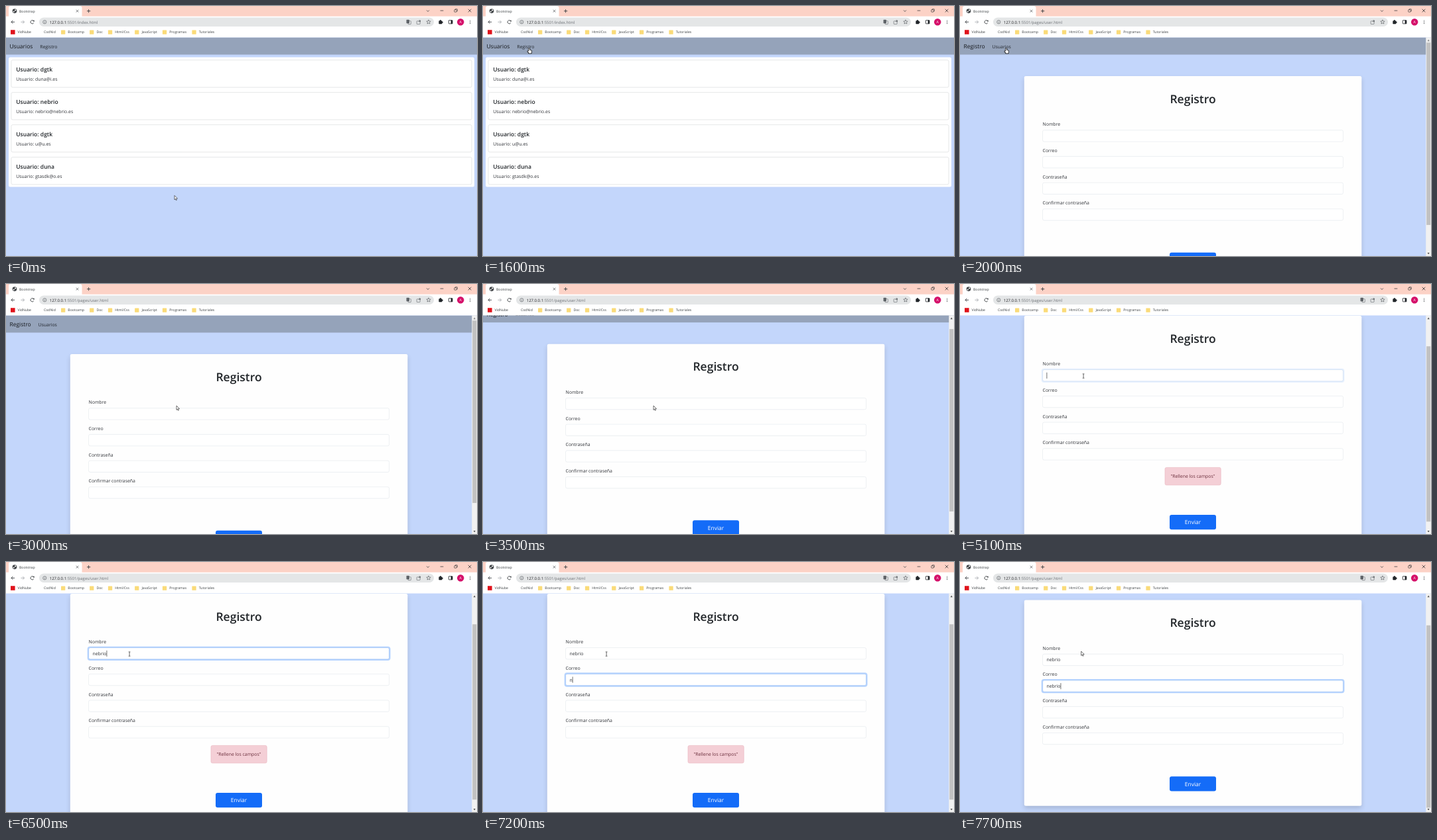
These frames come from a looping animation (710x378 px, 8 s). An HTML page with a canvas:

```html
<!DOCTYPE html>
<html lang="es">
<head>
<meta charset="utf-8">
<title>Bootstrap</title>
<style>
html, body { margin: 0; width: 100%; height: 100%; overflow: hidden; background: #c3d6fb; }
canvas { display: block; width: 710px; height: 378px; }
</style>
</head>
<body>
<canvas id="stage"></canvas>
<script>
const W = 710, H = 378, LOOP = 8000;
const TOP = 47.5;          // where the page begins
const NAV = 26;            // navbar height
const SCROLL_MAX = 48.5;
const FIELD_H = 17.4, FIELD_GAP = 39.7;
const BODY = 6.9, BRAND = 8.5, TITLE = 17.5, SMALL = 5.15;
const FONT = '"Open Sans", "Noto Sans", sans-serif';
const INK = '#212529', SOFT = '#303338', ICON = '#3c4043', GREY = '#5f6368';
const USER = 'nebrio';

const canvas = document.getElementById('stage');
const dpr = window.devicePixelRatio || 1;
canvas.width = W * dpr;
canvas.height = H * dpr;
const c = canvas.getContext('2d');

const span = (t, a, b) => Math.max(0, Math.min(1, (t - a) / (b - a)));
const smooth = u => u * u * (3 - 2 * u);
const mix = (a, b, u) => a + (b - a) * u;

/* ---- drawing helpers ---- */
function text(s, x, y, size, color = INK, weight = 400, align = 'left') {
  c.font = `${weight} ${size}px ${FONT}`;
  c.textRendering = 'geometricPrecision';
  c.textAlign = align;
  c.fillStyle = color;
  c.fillText(s, x, y);
  return c.measureText(s).width;
}

function paint(fill, stroke, lw) {
  if (fill) { c.fillStyle = fill; c.fill(); }
  if (stroke) { c.strokeStyle = stroke; c.lineWidth = lw; c.stroke(); }
}

function box(x, y, w, h, r, fill, stroke, lw = 0.6) {
  c.beginPath();
  c.roundRect(x, y, w, h, r);
  paint(fill, stroke, lw);
}

function disc(x, y, r, fill, stroke, lw = 0.7) {
  c.beginPath();
  c.arc(x, y, r, 0, 7);
  paint(fill, stroke, lw);
}

function poly(x, y, pts, fill, stroke, lw) {
  c.beginPath();
  for (let i = 0; i < pts.length; i += 2) c.lineTo(x + pts[i], y + pts[i + 1]);
  c.closePath();
  paint(fill, stroke, lw);
}

function line(x0, y0, x1, y1, color, lw = 0.7) {
  c.beginPath();
  c.moveTo(x0, y0);
  c.lineTo(x1, y1);
  paint(null, color, lw);
}

function cross(x, y, r, color = ICON) {
  line(x - r, y - r, x + r, y + r, color);
  line(x - r, y + r, x + r, y - r, color);
}

// A bent stroke whose tip points along the angle.
function chevron(x, y, r, angle, color, lw = 0.9) {
  for (const side of [-1, 1]) {
    const a = angle + Math.PI + side * Math.PI / 4;
    line(x, y, x + r * Math.cos(a), y + r * Math.sin(a), color, lw);
  }
}

function arrow(x, y, r, angle, color) {
  const dx = r * Math.cos(angle), dy = r * Math.sin(angle);
  line(x - dx, y - dy, x + dx, y + dy, color, 0.9);
  chevron(x + dx, y + dy, r * 1.3, angle, color);
}

// Star when inner and outer radius differ, triangle with three equal points.
function spikes(x, y, n, outer, inner, turn, fill, stroke) {
  const pts = [];
  for (let i = 0; i < n; i++) {
    const r = i % 2 ? inner : outer, a = turn + i * 2 * Math.PI / n;
    pts.push(r * Math.cos(a), r * Math.sin(a));
  }
  poly(x, y, pts, fill, stroke, 0.7);
}

const UP = -Math.PI / 2, DOWN = Math.PI / 2;
const triangle = (x, y, r, turn, color) => spikes(x, y, 3, r, r, turn, color);

/* ---- browser window ---- */
function tabStrip() {
  const y = 7.6;
  c.fillStyle = '#fcd2c6';
  c.fillRect(0, 0, W, 16);
  box(4, 0, 110.5, 18, 3, '#fff');
  disc(13, y, 3.3, ICON);
  disc(11.7, y + 0.9, 1.1, '#fff');
  disc(14.2, y - 1.2, 1.1, '#fff');
  text('Bootstrap', 20, y + 2, SMALL, ICON);
  cross(107.5, y, 1.8);
  line(122, y, 127.3, y, ICON, 0.9);
  line(124.6, y - 2.6, 124.6, y + 2.6, ICON, 0.9);
  chevron(636, y + 0.8, 2.8, DOWN, ICON, 0.8);
  line(654.6, 7, 659.4, 7, INK);
  box(677, 4.6, 3.4, 3.4, 0.5, null, INK);
  box(675.8, 5.7, 3.4, 3.4, 0.5, '#fcd2c6', INK);
  cross(699, 7, 2.3, INK);
}

function toolbar(path, translate) {
  const y = 24.2, pill = '#e4e6e7';
  c.fillStyle = '#fff';
  c.fillRect(0, 15.6, W, TOP - 15.6);
  arrow(10.5, y, 2.6, Math.PI, ICON);
  arrow(25, y, 2.6, 0, '#a9acb0');
  c.beginPath();
  c.arc(39.6, y, 2.6, 0.5, 5.6);
  paint(null, ICON, 0.9);
  triangle(41.8, y - 1.6, 1.6, Math.PI / 4, ICON);

  box(50, y - 6.7, 595, 13.4, 6.7, pill);
  disc(58.3, y, 2.6, null, GREY);
  line(58.3, y - 0.4, 58.3, y + 1.5, GREY);
  disc(58.3, y - 1.3, 0.4, GREY);
  const w = text('127.0.0.1', 65.7, y + 2.3, 6, '#202124');
  text(path, 65.7 + w, y + 2.3, 6, '#6c7075');

  if (translate) {
    box(606, y - 1.6, 4.4, 5, 0.6, null, GREY);
    box(603.6, y - 3.4, 4.4, 5.4, 0.6, GREY);
  }
  box(619.2, y - 1.4, 5, 4.6, 0.5, null, GREY);
  arrow(623.4, y - 1.2, 1.6, -0.6, GREY);
  spikes(637, y, 10, 3.4, 1.5, UP, null, GREY);

  box(652.4, y - 2, 5, 5, 0.7, INK);
  disc(654.9, y - 2.2, 1.1, INK);
  disc(657.7, y + 0.5, 1.1, INK);
  box(667.4, y - 2.6, 5.6, 5.2, 0.4, null, INK, 0.8);
  box(670.6, y - 2.6, 2.4, 5.2, 0, INK);
  disc(685.2, y, 5.2, '#d5106a');
  text('A', 685.2, y + 1.9, 5.2, '#fff', 400, 'center');
  for (const dy of [-2.2, 0, 2.2]) disc(699.6, y + dy, 0.6, ICON);
}

function bookmarks() {
  const y = 41.4;
  box(7, 36.2, 6.6, 6.6, 0, '#e0131c');
  text('VidNube', 17.4, y, SMALL, ICON);
  text('CodNid', 57, y, SMALL, ICON);
  let x = 83;
  for (const name of ['Bootcamp', 'Doc', 'Html/Css', 'JavaScript', 'Programas', 'Tutoriales']) {
    box(x, 36.4, 6.3, 6.3, 0.5, '#fadb79');
    x += 10.3 + text(name, x + 10.3, y, SMALL, ICON) + 8.2;
  }
}

/* ---- pages ---- */
function navbar(y, brand, link) {
  c.fillStyle = '#95a3ba';
  c.fillRect(0, y, W, NAV);
  const w = text(brand, 5.4, y + 16.9, BRAND, '#16191d');
  text(link, 5.4 + w + 10.8, y + 16.2, BODY, '#22272e');
}

function listPage() {
  navbar(TOP, 'Usuarios', 'Registro');
  box(4, 77.5, 702, 196, 2.5, '#fff');
  const users = { 'duna@i.es': 'dgtk', [`${USER}@${USER}.es`]: USER, 'u@u.es': 'dgtk', 'gtasdk@o.es': 'duna' };
  Object.entries(users).forEach(([mail, name], i) => {
    const y = 81.7 + 48.95 * i;
    box(8, y, 694, 41.3, 2, '#fff', '#d6d7d9');
    text('Usuario: ' + name, 15.3, y + 17, BRAND, INK, 600);
    text('Usuario: ' + mail, 15.3, y + 31, BODY, SOFT);
  });
}

function scrollbar(s) {
  const total = s.alert ? 394 : 378.7, k = 316 / total;
  c.fillStyle = '#f1f1f1';
  c.fillRect(702.3, TOP, 8, H);
  c.fillStyle = '#c1c1c1';
  c.fillRect(703.2, 55.3 + s.scroll * k, 6, (H - TOP) * k);
  triangle(706.2, 52.4, 1.8, UP, s.scroll ? '#505050' : '#8a8a8a');
  triangle(706.2, 373.8, 1.8, DOWN, '#505050');
}

const fieldY = (s, i) => s.card + 81.7 + FIELD_GAP * i;

function field(s, i, label) {
  const x = 124.6, y = fieldY(s, i), f = s.focus[i];
  text(label, x, y - 6.5, BODY, SOFT);
  if (f) box(x - 1, y - 1, 455, FIELD_H + 2, 3, null, `rgba(13,110,253,${0.3 * f})`, 1.9);
  box(x, y, 453, FIELD_H, 2.3, '#fff', '#e1e6eb');
  if (f) box(x, y, 453, FIELD_H, 2.3, null, `rgba(134,183,254,${f})`);
  const w = text(s.values[i], x + 5.8, y + 11.2, BODY, SOFT);
  if (s.caret === i) line(x + 6.3 + w, y + 4.2, x + 6.3 + w, y + 13.4, '#111', 0.6);
}

function formPage(s) {
  const mid = 351;
  navbar(TOP - s.scroll, 'Registro', 'Usuarios');
  c.save();
  c.shadowColor = 'rgba(0,0,0,.15)';
  c.shadowBlur = 7.4 * dpr;
  c.shadowOffsetY = 3.7 * dpr;
  box(96.8, s.card, 508.6, s.button + 44.6 - s.card, 2.3, '#fefefe');
  c.restore();
  text('Registro', mid, s.card + 40.7, TITLE, INK, 600, 'center');
  ['Nombre', 'Correo', 'Contraseña', 'Confirmar contraseña'].forEach((label, i) => field(s, i, label));
  if (s.alert) {
    box(309, s.card + 229.5, 84.2, 26.6, 2.3, '#f4cfd6', '#eab6c0');
    text('"Rellene los campos"', mid, s.card + 245.2, BODY, '#6b2f3c', 400, 'center');
  }
  box(mid - 35, s.button, 70, 22.4, 3, s.hover ? '#0d5bd0' : '#146cf8');
  text('Enviar', mid, s.button + 14.4, BRAND, '#fff', 400, 'center');
  scrollbar(s);
}

/* ---- pointer ---- */
// Start, end and the place reached.
const MOVES = [
  [0, 1, 254, 286.5],
  [500, 1400, 66, 71.5],
  [1400, 1600, 69.4, 63.8],
  [2200, 3000, 257, 184],
  [3500, 4100, 352, 336.8],
  [4300, 4900, 182.7, 135]
];

function pointerAt(t) {
  let [, , x, y] = MOVES[0];
  for (const [a, b, x1, y1] of MOVES) {
    const u = smooth(span(t, a, b));
    x = mix(x, x1, u);
    y = mix(y, y1, u);
  }
  return [x, y];
}

const over = ([x, y], l, t, w, h) => x > l && x < l + w && y > t && y < t + h;

function hand(x, y) {
  // Outline first, then the same shapes smaller in white.
  for (const [grow, color] of [[0.4, '#111'], [-0.3, '#fff']]) {
    const part = (dx, dy, w, h, r) =>
      box(x + dx - grow, y + dy - grow, w + 2 * grow, h + 2 * grow, r, color);
    part(-0.8, 0, 1.7, 5, 0.8);
    part(-0.8, 3, 4.6, 5, 1.2);
    part(-2.3, 4.2, 2.4, 2, 0.8);
  }
}

function pointer(s) {
  const [x, y] = s.mouse;
  if (s.kind === 'hand') {
    hand(x, y);
  } else if (s.kind === 'beam') {
    const bx = x + 3.4, by = y + 4.1;
    line(bx, by - 3.2, bx, by + 3.2, '#222');
    for (const end of [-3.2, 3.2]) line(bx - 1.4, by + end, bx + 1.4, by + end, '#222', 0.6);
  } else {
    poly(x, y, [0, 0, 0, 6.4, 1.4, 5.1, 2.4, 7.3, 3.4, 6.8, 2.5, 4.7, 4.5, 4.6], '#fff', '#111', 0.6);
  }
}

/* ---- state at a time ---- */
// One letter each tenth of a second.
const typed = (t, start) => USER.slice(0, Math.max(0, Math.floor((t - start) / 100) + 1));

function stateAt(t) {
  const s = { form: t >= 2000, mouse: pointerAt(t), alert: t >= 4300 && t < 7300 };
  const scrolled = span(t, 3200, 4000);
  s.scroll = SCROLL_MAX * smooth(scrolled);
  // The card stays centred, so the alert lifts its top edge.
  s.card = 106 - s.scroll - (s.alert ? 9.6 : 0);
  s.button = s.card + (s.alert ? 301 : 266.7);

  const first = span(t, 5050, 5200), second = span(t, 6800, 6950);
  s.focus = [first * (1 - second), second, 0, 0];
  s.values = [typed(t, 6000), typed(t, 7200), '', ''];
  const blink = t >= 5600 && t < 6000;
  s.caret = t >= 6900 ? 1 : t >= 5100 && !blink ? 0 : -1;

  const link = over(s.mouse, 48, 54 - s.scroll, 34, 16);
  s.hover = s.form && over(s.mouse, 316, s.button, 70, 22.4);
  const onField = s.form && [0, 1, 2, 3].some(i => over(s.mouse, 124.6, fieldY(s, i), 453, FIELD_H));
  const scrolling = scrolled > 0 && scrolled < 1;
  s.kind = scrolling ? 'arrow' : link || s.hover ? 'hand' : onField ? 'beam' : 'arrow';
  return s;
}

function draw(t) {
  const s = stateAt(t);
  c.setTransform(dpr, 0, 0, dpr, 0, 0);
  c.fillStyle = '#c3d6fb';
  c.fillRect(0, 0, W, H);
  if (s.form) formPage(s); else listPage();
  tabStrip();
  toolbar(s.form ? ':5501/pages/user.html' : ':5501/index.html', t < 2000 || t >= 2300);
  bookmarks();
  pointer(s);
}

function tick() {
  draw(Math.floor(performance.now() % LOOP / 100) * 100);
  requestAnimationFrame(tick);
}
tick();
</script>
</body>
</html>
```
